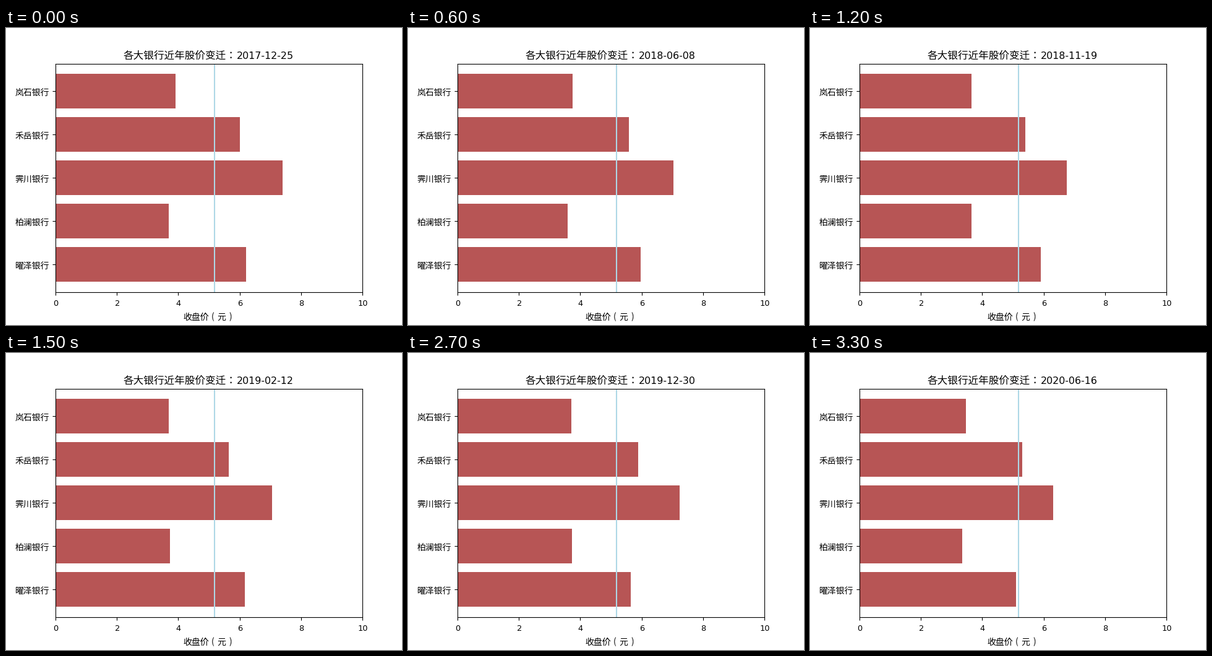
A matplotlib script that plays this animation: 640x480 px, repeating every 3600 ms.

```python
import matplotlib.pyplot as plt
from matplotlib.animation import FuncAnimation

W, H, DPI = 640, 480, 100
CJK, LATIN = "Noto Sans CJK JP", "DejaVu Sans"

# Listed from the bottom bar to the top bar.
BANKS = ["曜泽银行", "柏澜银行", "霁川银行", "禾岳银行", "岚石银行"]

CLOSES = [
    ("2017-12-25", [6.21, 3.69, 7.40, 6.00, 3.91]),
    ("2018-03-19", [6.30, 4.03, 8.05, 6.36, 4.08]),
    ("2018-06-08", [5.97, 3.59, 7.04, 5.59, 3.75]),
    ("2018-08-24", [5.72, 3.60, 6.95, 5.48, 3.53]),
    ("2018-11-19", [5.91, 3.65, 6.75, 5.40, 3.65]),
    ("2019-02-12", [6.17, 3.73, 7.06, 5.65, 3.69]),
    ("2019-05-06", [6.06, 3.65, 7.04, 5.66, 3.76]),
    ("2019-07-22", [5.77, 3.57, 7.22, 5.65, 3.67]),
    ("2019-10-15", [5.62, 3.59, 7.28, 5.74, 3.67]),
    ("2019-12-30", [5.65, 3.73, 7.24, 5.89, 3.71]),
    ("2020-03-25", [5.16, 3.37, 6.47, 5.17, 3.52]),
    ("2020-06-16", [5.10, 3.35, 6.31, 5.30, 3.47]),
]
MEAN = 5.18

fig = plt.figure(figsize=(W / DPI, H / DPI), dpi=DPI, facecolor="white")
ax = fig.add_axes([0.125, 0.11, 0.775, 0.77])


def put(s, x, y, size=10, font=CJK, ha="left"):
    """Text with its baseline at pixel (x, y), measured from the top left."""
    return fig.text(x / W, 1 - y / H, s, fontsize=size, family=font,
                    ha=ha, va="baseline", color="black")


bars = ax.barh(range(len(BANKS)), CLOSES[0][1], height=0.8,
               color="brown", alpha=0.8)
ax.axvline(MEAN, color="lightblue", linewidth=1.5)
ax.set_xlim(0, 10)
ax.set_ylim(-0.64, 4.64)
ax.set_xticks(range(0, 11, 2))
ax.set_yticks(range(len(BANKS)))
ax.tick_params(labelbottom=False, labelleft=False)

for i, name in enumerate(BANKS):
    put(name, 70, 388.7 - 70 * i, ha="right")
for v in range(0, 11, 2):
    put(str(v), 80.5 + 49.6 * v, 449, 9.3, LATIN, "center")

put("收盘价", 286.5, 471.5)
put("(", 334.5, 471.5, ha="center")
put("元", 341.5, 471.5)
put(")", 362.5, 471.5, ha="center")

put("各大银行近年股价变迁：", 190, 50, 12)
date = put(CLOSES[0][0], 372.5, 50, 11.4, LATIN)


def update(k):
    day, prices = CLOSES[k]
    for bar, price in zip(bars, prices):
        bar.set_width(price)
    date.set_text(day)
    return [*bars, date]


anim = FuncAnimation(fig, update, frames=len(CLOSES), interval=300,
                     repeat=True, repeat_delay=0, blit=False)
plt.show()
```
